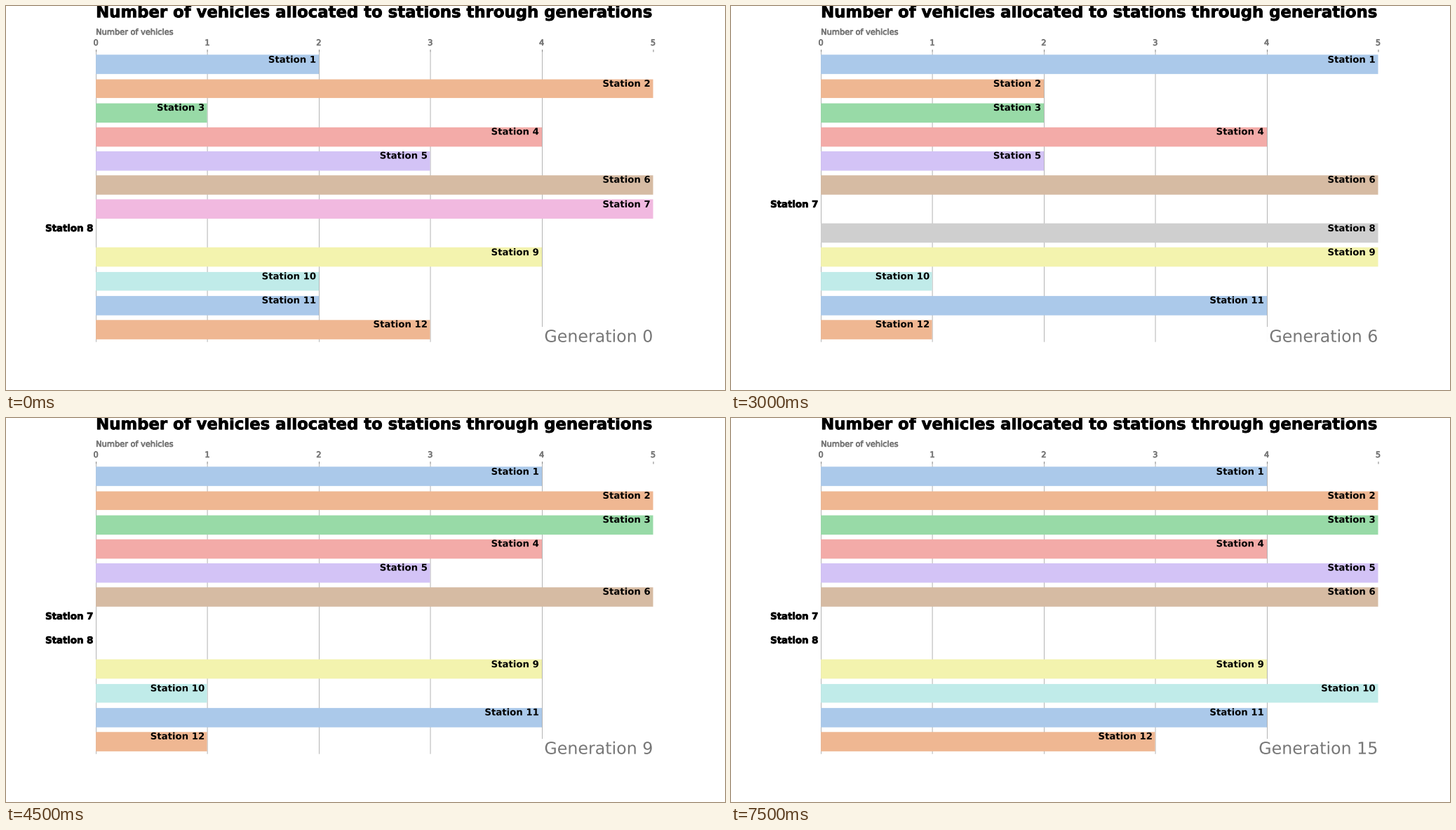
Recreate the animation shown at these times as a matplotlib script. Size 1025 by 547 pixels, loop 8 s.

```python
import matplotlib.pyplot as plt
from matplotlib.animation import FuncAnimation
from matplotlib.patheffects import Normal, Stroke

W, H, DPI = 1025, 547, 64
CW, CH = 1080, 576                # drawing canvas, scaled down to the stage
PT = W / CW * 72 / DPI            # one canvas unit in points
GREY = "#777777"
COLORS = ["#abc9ea", "#efb792", "#98daa7", "#f3aba8", "#d3c3f6",
          "#d6bba3", "#f1b9e0", "#cfcfcf", "#f3f3ae", "#c0ebe9"]

GENERATIONS, STATIONS, MAX = 16, 12, 5
LEFT, RIGHT = 0.125 * CW, 0.9 * CW
TOP, BOTTOM = 0.12 * CH, 0.875 * CH
STEP = (RIGHT - LEFT) / MAX
SPAN = STATIONS - 0.2             # bars are 0.8 of a row high
ROW = (BOTTOM - TOP) / (1.02 * SPAN)


def cross(base, donor, *stations):
    """Copy of base with the genes of some stations taken from donor."""
    return [donor[i] if i + 1 in stations else gene
            for i, gene in enumerate(base)]


def mutate(base, station, value):
    return cross(base, [value] * STATIONS, station)


first = [2, 5, 1, 4, 3, 5, 5, 0, 4, 2, 2, 3]
second = [5, 2, 2, 4, 2, 5, 0, 5, 5, 1, 4, 1]
third = [2, 2, 5, 0, 4, 5, 5, 0, 4, 5, 4, 0]
fourth = mutate(cross(cross(first, second, 7, 10, 11, 12), third, 3), 1, 4)

# best allocation, keyed by the generation that found it
BEST = {
    0: first,
    1: cross(cross(second, first, 5, 6, 7, 8), third, 12),
    2: second,
    7: third,
    8: cross(cross(third, first, 5), second, 12),
    9: fourth,
    10: mutate(cross(cross(fourth, third, 10), first, 12), 5, 5),
}

plt.rcParams["text.hinting"] = "none"
fig = plt.figure(figsize=(W / DPI, H / DPI), dpi=DPI, facecolor="white")
ax = fig.add_axes([0, 0, 1, 1])
ax.axis("off")


def x_of(value):
    return LEFT + STEP * value


def y_of(row):
    return TOP + ROW * (0.01 * SPAN + row)


def hard(color):
    """Slightly swollen text, as on a bare background."""
    return [Stroke(linewidth=0.8 * PT, foreground=color, joinstyle="round"),
            Normal()]


def text(x, y, string, size, color="black", effects=None, **style):
    return ax.text(x, y, string, size=size * PT, color=color,
                   path_effects=effects or hard(color), **style)


# grid and ticks
lines = [round(x_of(v)) + 0.5 for v in range(MAX + 1)]
ax.vlines(lines[:-1], round(TOP), BOTTOM, color="#b0b0b0", linewidth=PT,
          snap=False, zorder=0)
ax.vlines(lines, round(TOP) - 3.5, round(TOP), color=GREY, linewidth=PT,
          snap=False, zorder=0)
for v in range(MAX + 1):
    text(x_of(v), 59, str(v), 12, GREY, ha="center")

text(LEFT, 17, "Number of vehicles allocated to stations through generations",
     24, weight="bold")
text(LEFT, 43, "Number of vehicles", 12, GREY)

tops = [round(y_of(i)) for i in range(STATIONS)]
heights = [round(y_of(i + 0.8)) - top for i, top in enumerate(tops)]
bars = ax.barh(tops, [0] * STATIONS, heights, left=LEFT, align="edge",
               color=[COLORS[i % len(COLORS)] for i in range(STATIONS)],
               snap=False)
labels = [text(LEFT, round(y_of(i + 0.4) - 3), f"Station {i + 1}", 14,
               weight="bold", ha="right") for i in range(STATIONS)]
counter = text(RIGHT, BOTTOM, "", 25, GREY, [Normal()], ha="right",
               bbox=dict(facecolor="white", edgecolor="white",
                         pad=4 * PT, linewidth=PT))
ax.set_xlim(0, CW)
ax.set_ylim(CH, 0)


def update(gen):
    best = BEST[max(g for g in BEST if g <= gen)]
    for bar, label, value in zip(bars, labels, best):
        bar.set_width(round(x_of(value)) - LEFT)
        label.set_x(x_of(value - MAX / 200))
        label.set_path_effects([Normal()] if value else hard("black"))
    counter.set_text(f"Generation {gen}")
    return []


anim = FuncAnimation(fig, update, frames=GENERATIONS, interval=500,
                     init_func=lambda: update(0), repeat=True, repeat_delay=0)
plt.show()
```
